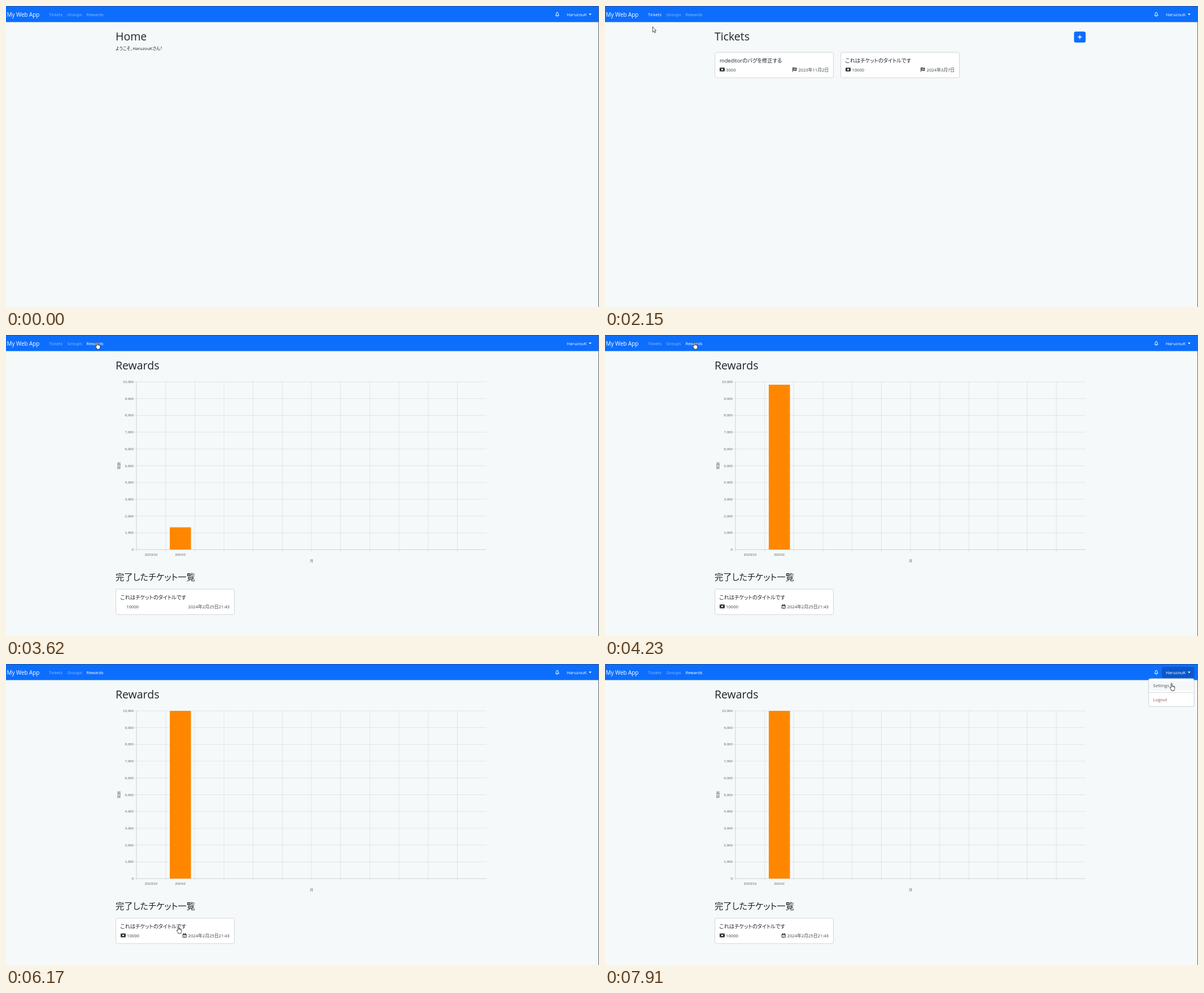
Animation, 1050 px wide and 533 px high, one loop 8000 ms. Source, as an HTML page:

```html
<!DOCTYPE html>
<html lang="ja">
<head>
<meta charset="utf-8">
<title>My Web App</title>
<style>
  html, body { margin: 0; width: 100%; height: 100%; overflow: hidden; background: #f5f9fa; }
  svg { display: block; width: 1050px; height: 533px; }
  text {
    font: 400 7.7px "Open Sans", "Noto Sans", "Noto Sans CJK JP", "Noto Sans CJK", sans-serif;
    font-feature-settings: "palt"; fill: #212529;
  }
  .brand { font-size: 9.9px; fill: #fff; }
  .link { font-size: 7.6px; fill: #fff; fill-opacity: .55; }
  .link.hover { fill-opacity: .75; }
  .link.active { fill-opacity: 1; }
  .user { font-size: 7.6px; font-weight: 500; fill: #fff; }
  .h1 { font-size: 19.5px; font-weight: 500; }
  .h2 { font-size: 15.3px; font-weight: 500; }
  .title { font-size: 9.3px; font-weight: 500; }
  .meta { fill: #3c4145; }
  .end { text-anchor: end; }
  .chart text { font: 6.2px "Liberation Sans", "Noto Sans CJK JP", "Noto Sans CJK", sans-serif; fill: #666; }
  .mid { text-anchor: middle; }
  .card { fill: #fff; stroke: #d2d5d8; }
  .hidden { display: none; }
</style>
</head>
<body>
<svg viewBox="0 0 1050 533">
  <defs>
    <g id="money">
      <rect width="9" height="6.6" rx=".8" fill="#212529"/>
      <circle cx="4.5" cy="3.3" r="1.7" fill="#fff"/>
      <path d="M1 1h1.1L1 2.1zM8 1v1.1L6.9 1zM1 5.6V4.5l1.1 1.1zM8 5.6H6.9L8 4.5z" fill="#fff"/>
    </g>
    <g id="flag">
      <path d="M.4 0v8M.4 .8q1.6-.8 3.3 0t3.3 0v4.6q-1.600.8-3.300 0t-3.300 0" fill="#555b60" stroke="#212529" stroke-width=".8"/>
      <path d="M1.300 1.600h1.300v1.200H1.300zM3.900 1.900h1.300v1.200H3.900zM2.600 3.200h1.300v1.200H2.600zM5.200 3.300h1.200v1.200H5.200z" fill="#fff"/>
    </g>
    <g id="calendar" fill="none" stroke="#212529">
      <rect x=".5" y="1.400" width="6" height="6" rx=".6"/>
      <path d="M.5 2.400h6M2 0v1.600M5 0v1.600" stroke-width="1.100"/>
      <path d="M2.200 4.900l1 1 1.700-1.800" stroke-width=".8"/>
    </g>
  </defs>

  <rect width="1050" height="533" fill="#f5f9fa"/>
  <rect width="1050" height="28.500" fill="#0d6efd"/>
  <rect width="1050" height="1" fill="#1d4f9e"/>
  <rect x="1049" width="1" height="533" fill="#62666a"/>
  <text class="brand" x="1.500" y="18.500">My Web App</text>
  <text class="link" x="76" y="17.500">Tickets</text>
  <text class="link" x="108.500" y="17.500">Groups</text>
  <text class="link" x="142.500" y="17.500">Rewards</text>
  <g id="bell">
    <path d="M973 16.800q1.300-1.200 1.300-3.300a1.800 1.900 0 0 1 3.600 0q0 2.100 1.300 3.300z" fill="none" stroke="#fff" stroke-width="1" stroke-linejoin="round"/>
    <path d="M976.100 10.700v1M975.100 18.300h2" stroke="#fff" stroke-width="1.100"/>
  </g>
  <rect id="userBg" class="hidden" x="986" y="5" width="57.500" height="19.500" rx="3.300" fill="#0a58ca"/>
  <text class="user" x="993" y="17.500">HaruzouK</text>
  <path d="M1031.800 13.600h5l-2.500 2.600z" fill="#fff"/>

  <g id="home">
    <text class="h1" x="194" y="61">Home</text>
    <text x="194" y="78.300" style="font-size:7.6px">ようこそ、HaruzouKさん！</text>
  </g>

  <g id="tickets">
    <text class="h1" x="194" y="61">Tickets</text>
    <rect x="830.500" y="45.300" width="20.500" height="19.500" rx="3.300" fill="#0d6efd"/>
    <path d="M837.300 55h6.800M840.700 51.600v6.800" stroke="#fff" stroke-width="1.300"/>
    <rect class="card" x="194.500" y="82" width="210" height="45" rx="3"/>
    <text class="title" x="203" y="99.500">mdeditorのバグを修正する</text>
    <use href="#money" x="203" y="109.200"/>
    <text class="meta" x="214" y="115.500">3000</text>
    <use href="#flag" x="332" y="108.800"/>
    <text class="meta end" x="396" y="115.500">2023年11月2日</text>
    <rect class="card" x="417.500" y="82" width="210" height="45" rx="3"/>
    <text class="title" x="425.500" y="99.500">これはチケットのタイトルです</text>
    <use href="#money" x="426" y="109.200"/>
    <text class="meta" x="437" y="115.500">10000</text>
    <use href="#flag" x="559" y="108.800"/>
    <text class="meta end" x="619" y="115.500">2024年3月7日</text>
  </g>

  <g id="rewards">
    <text class="h1" x="194" y="61">Rewards</text>
    <g class="chart">
      <path id="grid" fill="none" stroke="#000" stroke-opacity=".1" stroke-width=".8"/>
      <g id="scale"></g>
      <rect id="bar" x="290" width="37.500" fill="#ff8700"/>
      <text class="mid" x="257" y="391.200">2023/10</text>
      <text class="mid" x="308.600" y="391.200">2024/2</text>
      <text class="mid" x="541" y="402">月</text>
      <text class="mid" transform="translate(201.500 231.500) rotate(-90)">報酬</text>
    </g>
    <text class="h2" x="194" y="433.500">完了したチケット一覧</text>
    <rect class="card" x="194.500" y="450" width="210" height="45" rx="3"/>
    <text class="title" x="202.500" y="467.500">これはチケットのタイトルです</text>
    <text class="meta" id="amount" y="483.600">10000</text>
    <text class="meta end" x="396" y="483.600">2024年2月25日21:43</text>
    <g id="icons">
      <use href="#money" x="203" y="477.300"/>
      <use href="#calendar" x="312.700" y="476.800"/>
    </g>
  </g>

  <g id="menu">
    <rect x="962.500" y="26" width="80.500" height="49.500" rx="3" fill="#fff" stroke="#cfd2d5"/>
    <rect id="itemBg" x="963" y="30" width="79.500" height="17" fill="#f5f7f9"/>
    <path d="M963 50.500h79.500" stroke="#d5d8da" stroke-width=".9"/>
    <text x="970.500" y="41" style="fill:#50565b">Settings</text>
    <text x="970.500" y="66" style="fill:#a34f5f">Logout</text>
  </g>

  <g id="cursor" fill="#fff" stroke="#222" stroke-width=".8" stroke-linejoin="round">
    <path id="arrow" d="M.3 .3v9.400l2.100-1.900 1.500 3.200 1.500-.7-1.400-3.100h2.700z"/>
    <path id="hand" d="M-.8 1q0-.9.900-.9t.9.9v3.700q1.500-.5 2 .3 1.200-.3 1.500.6 1.300-.1 1.300 1.100v2.600q0 1.300-.8 2.500v1.400H-.2v-1.200L-2.600 8.600q-.6-1.200.4-1.500l1.400 1zM1 4.700v2M3 5.100v1.800M4.500 5.700v1.500"/>
  </g>
</svg>
<script>
  const LOOP = 8000, STEP = 67;   // the picture advances in steps of 67 ms
  const TICKETS = 26, REWARDS = 53, ICONS = 55, MENU = 107;
  const BAR_START = 3583, BAR_TIME = 1000;

  // pointer positions: [step, x, y]
  const path = [
    [1, 1016, 522], [5, 600, 415], [9, 165, 240], [12, 2, 104], [13, 1, 76], [16, 76, 48],
    [18, 76, 48], [20, 80, 27], [22, 83, 14], [26, 82, 13], [30, 83, 16], [32, 84, 36.500],
    [36, 87, 57], [39, 114, 31], [41, 133, 14], [43, 111, 21], [45, 129, 12], [46, 129, 12],
    [49, 158, 14], [51, 161, 12], [59, 161, 12], [61, 158, 12], [63, 158, 12],
    [64, 164, 24], [66, 205, 120], [69, 251, 238], [71, 251, 238], [75, 277, 350], [79, 304, 465],
    [91, 304, 465], [92, 305, 464], [93, 400, 412], [94, 590, 300], [95, 744, 193], [97, 744, 193],
    [98, 830, 140], [99, 930, 78], [100, 991, 41], [101, 991, 41], [104, 1002, 15], [107, 1003, 14],
    [109, 1004, 24], [112, 1002, 34], [117, 1002, 34], [118, 1003, 34]
  ];

  const $ = id => document.getElementById(id);
  const show = (id, on) => $(id).classList.toggle('hidden', !on);
  const inside = ([x, y], [l, t, r, b]) => x >= l && x <= r && y >= t && y <= b;
  const links = [...document.querySelectorAll('.link')];
  const linkBoxes = [[72, 4, 104, 26], [104, 4, 138, 26], [138, 4, 177, 26]];
  const userBox = [986, 4, 1043, 25], itemBox = [963, 30, 1043, 47], cardBox = [194, 450, 405, 495];

  let grid = '', scale = '';
  for (let i = 0; i <= 10; i++) {
    const y = 380 - i * 29.7;
    grid += `M227 ${y}H851`;
    scale += `<text class="end" x="226" y="${y + 2}">${(i * 1000).toLocaleString('en-US')}</text>`;
  }
  for (let i = 0; i < 12; i++) grid += `M${231 + i * 51.66} 82.800V384`;
  $('grid').setAttribute('d', grid + 'M231 82.800V380M231 380H851');
  $('scale').innerHTML = scale;

  function pointAt(step) {
    const i = path.findIndex(p => p[0] >= step);
    if (i < 1) return path[i < 0 ? path.length - 1 : 0].slice(1);
    const [s0, x0, y0] = path[i - 1], [s1, x1, y1] = path[i];
    const k = (step - s0) / (s1 - s0);
    return [x0 + (x1 - x0) * k, y0 + (y1 - y0) * k];
  }

  function draw(time) {
    const step = Math.floor((time + 8) / STEP);
    const onRewards = step >= REWARDS, loaded = step >= ICONS;
    const page = onRewards ? 2 : step >= TICKETS ? 0 : -1;
    show('home', page < 0);
    show('tickets', page === 0);
    show('rewards', onRewards);
    show('icons', loaded);
    show('bell', !onRewards || loaded);
    $('amount').setAttribute('x', loaded ? 214 : 213);

    const p = Math.min(1, Math.max(0, (step * STEP - BAR_START) / BAR_TIME));
    const height = 297 * (1 - (1 - p) ** 4);
    $('bar').setAttribute('y', 380 - height);
    $('bar').setAttribute('height', height);

    const pos = pointAt(step), open = step >= MENU, seen = step >= 1;
    const over = linkBoxes.map(box => seen && inside(pos, box));
    links.forEach((link, i) => {
      link.classList.toggle('active', i === page);
      link.classList.toggle('hover', over[i]);
    });
    const onItem = open && inside(pos, itemBox);
    const hand = over.includes(true) || inside(pos, userBox) || onItem || onRewards && inside(pos, cardBox);
    show('menu', open);
    show('userBg', open);
    show('itemBg', onItem);
    show('cursor', seen);
    show('arrow', !hand);
    show('hand', hand);
    $('cursor').setAttribute('transform', `translate(${pos})`);
  }

  const start = performance.now();
  function tick() {
    draw((performance.now() - start) % LOOP);
    requestAnimationFrame(tick);
  }
  tick();
</script>
</body>
</html>
```
